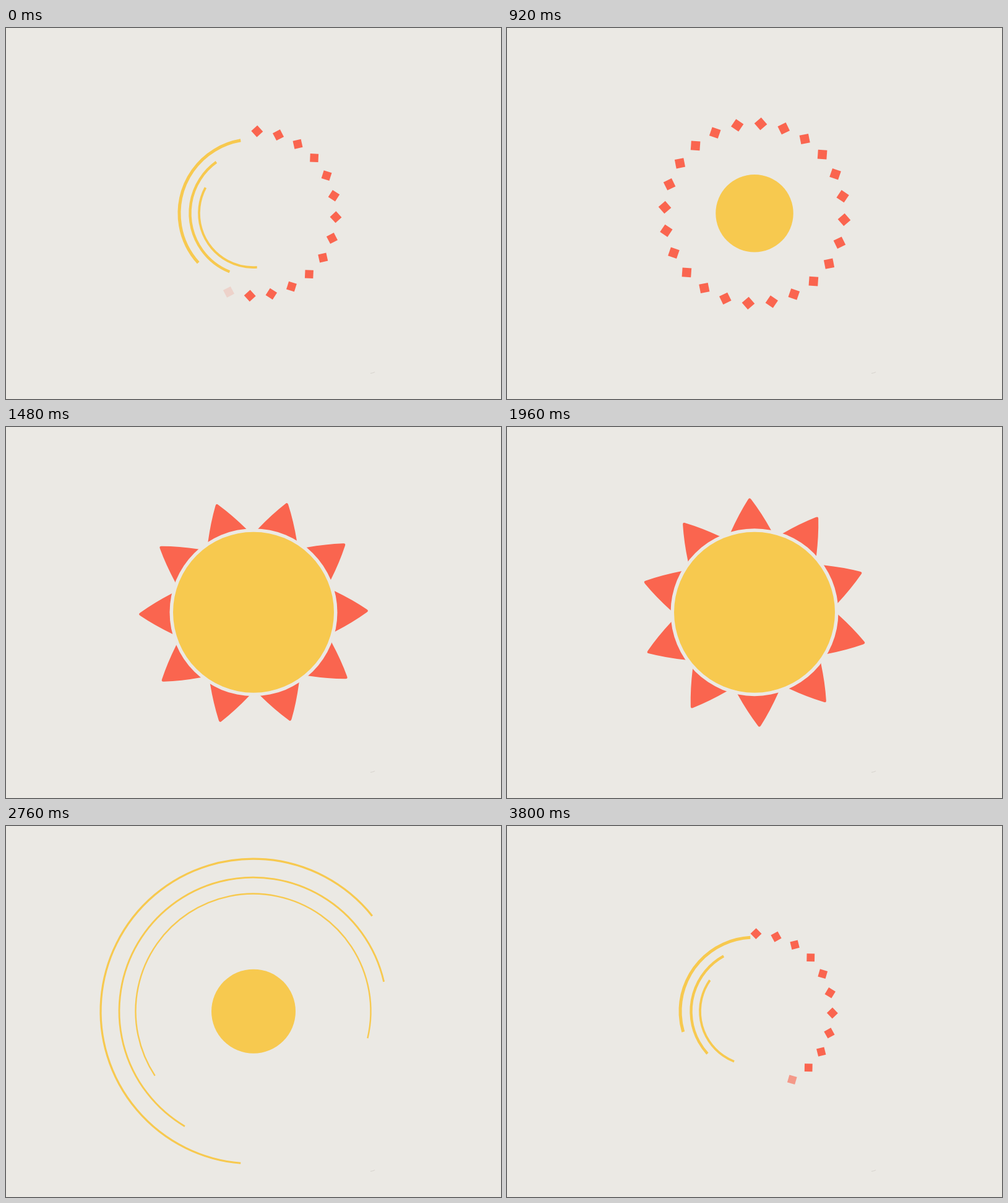
Write an HTML page with a canvas that moves like this. It is 800 px wide and 600 px high and loops after 3840 ms.

```html
<!DOCTYPE html>
<html lang="en">
<head>
<meta charset="utf-8">
<title>Sun loop</title>
<style>
  html, body { margin: 0; width: 100%; height: 100%; overflow: hidden; background: #ebe9e4; }
  canvas { display: block; }
</style>
</head>
<body>
<canvas id="stage" width="800" height="600"></canvas>
<script>
const LOOP = 3840, STEP = 40;
const PAPER = '#ebe9e4', YELLOW = '#f7c94f', RED = '#fa654f';
const ctx = document.getElementById('stage').getContext('2d');
const rad = deg => deg * Math.PI / 180;

// Eased progress from 0 to 1 between two times
function ease(t, from, to) {
  const u = Math.min(1, Math.max(0, (t - from) / (to - from)));
  return u * u * (3 - 2 * u);
}

function disc(r, color) {
  ctx.beginPath();
  ctx.arc(400, 299.7, Math.max(0, r), 0, 2 * Math.PI);
  ctx.fillStyle = color;
  ctx.fill();
}

// Runs draw() at a clockwise angle from the top of the circle
function spoke(deg, draw) {
  ctx.save();
  ctx.translate(400, 300);
  ctx.rotate(rad(deg));
  draw();
  ctx.restore();
}

function square(deg, r, side, turn, alpha = 1) {
  spoke(deg, () => {
    ctx.translate(0, -r);
    ctx.rotate(rad(turn));
    ctx.globalAlpha = alpha;
    ctx.fillStyle = RED;
    ctx.fillRect(-side / 2, -side / 2, side, side);
  });
}

function ray(deg, inset) {
  spoke(deg, () => {
    ctx.translate(0, inset);
    ctx.beginPath();
    ctx.moveTo(-39, -120);
    ctx.lineTo(-32.5, -132);
    ctx.quadraticCurveTo(-18.5, -160, -2.5, -183);
    ctx.quadraticCurveTo(0, -187, 2.5, -183);
    ctx.quadraticCurveTo(18.5, -160, 32.5, -132);
    ctx.lineTo(39, -120);
    ctx.fillStyle = RED;
    ctx.fill();
  });
}

// Three arcs, each a little ahead of the one outside it
function sweep(radii, dir, head, tail, width) {
  if (width < 0.05 || head - tail < 0.05) return;
  ctx.strokeStyle = YELLOW;
  radii.forEach((r, i) => {
    const at = deg => rad(dir * (deg + 26 * i) - 90);
    ctx.beginPath();
    ctx.arc(399.5, 299.6, r, at(tail), at(head), dir < 0);
    ctx.lineWidth = width * (1 - 0.13 * i);
    ctx.stroke();
  });
}

function dotRing(t, spin) {
  const r = 109.1 + 51.7 * ease(t, -200, 220) - 15.5 * ease(t, 220, 620)
    - 35 * ease(t, 1040, 1200);
  const shown = 13.17 + 0.064 * t;
  for (let i = 0; i < 24; i++) {
    const alpha = Math.min(1, shown - i);
    if (alpha > 0) square(spin + 15 * i, r, r / 9.93, 45, alpha);
  }
}

function draw(now) {
  const t = now % LOOP;
  const early = t > 3400 ? t - LOOP : t;
  const spin = 2.5 + 0.0342 * early;

  ctx.fillStyle = PAPER;
  ctx.fillRect(0, 0, 800, 600);
  ctx.strokeStyle = '#d6d3cd';
  ctx.lineWidth = 1;
  ctx.beginPath();
  ctx.moveTo(589, 558.5);
  ctx.quadraticCurveTo(593, 558, 596, 556.5);
  ctx.stroke();

  if (early < 900) {
    sweep([119.5, 102, 87.5], -1, 720 * ease(early, -350, 930),
      720 * ease(early, -88, 1192), 5 * (1 - ease(early, 100, 780)));
  }
  if (early < 1240) dotRing(early, spin);

  if (t > 1200 && t < 2180) {
    const inset = 60 * (1 - ease(t, 1200, 1420) + ease(t, 2000, 2180));
    for (let i = 0; i < 10; i++) ray(spin + 36 * i, inset);
  }
  if (t > 2130 && t < 2700) {
    const r = 110 + 36.8 * ease(t, 2130, 2330) - 100 * ease(t, 2450, 2700);
    const extra = 7.6 * (Math.max(0, t - 2100) / 300) ** 2;
    for (let i = 0; i < 10; i++) square(spin + extra + 36 * i, r, 18.5, 1);
  }
  if (t > 1950 && t < 3040) {
    sweep([246.5, 216.5, 190], 1, 720 * ease(t, 1955, 3425),
      720 * ease(t, 2273, 3743), 3.5 * (1 - ease(t, 2700, 3040)));
  }

  if (t > 627 && t < 3150) {
    const r = 130 * ease(t, 627, 1227) - 72 * ease(t, 2180, 2600)
      + 89.3 * ease(t, 2660, 3140);
    if (t > 1000 && t < 2340) disc(r + 5.5, PAPER);
    disc(r, YELLOW);
    if (t > 2800) disc(145.9 * ease(t, 2800, 3160), PAPER);
  }
}

const start = performance.now();
function tick() {
  draw(Math.floor((performance.now() - start) / STEP) * STEP);
  requestAnimationFrame(tick);
}
tick();
</script>
</body>
</html>
```
